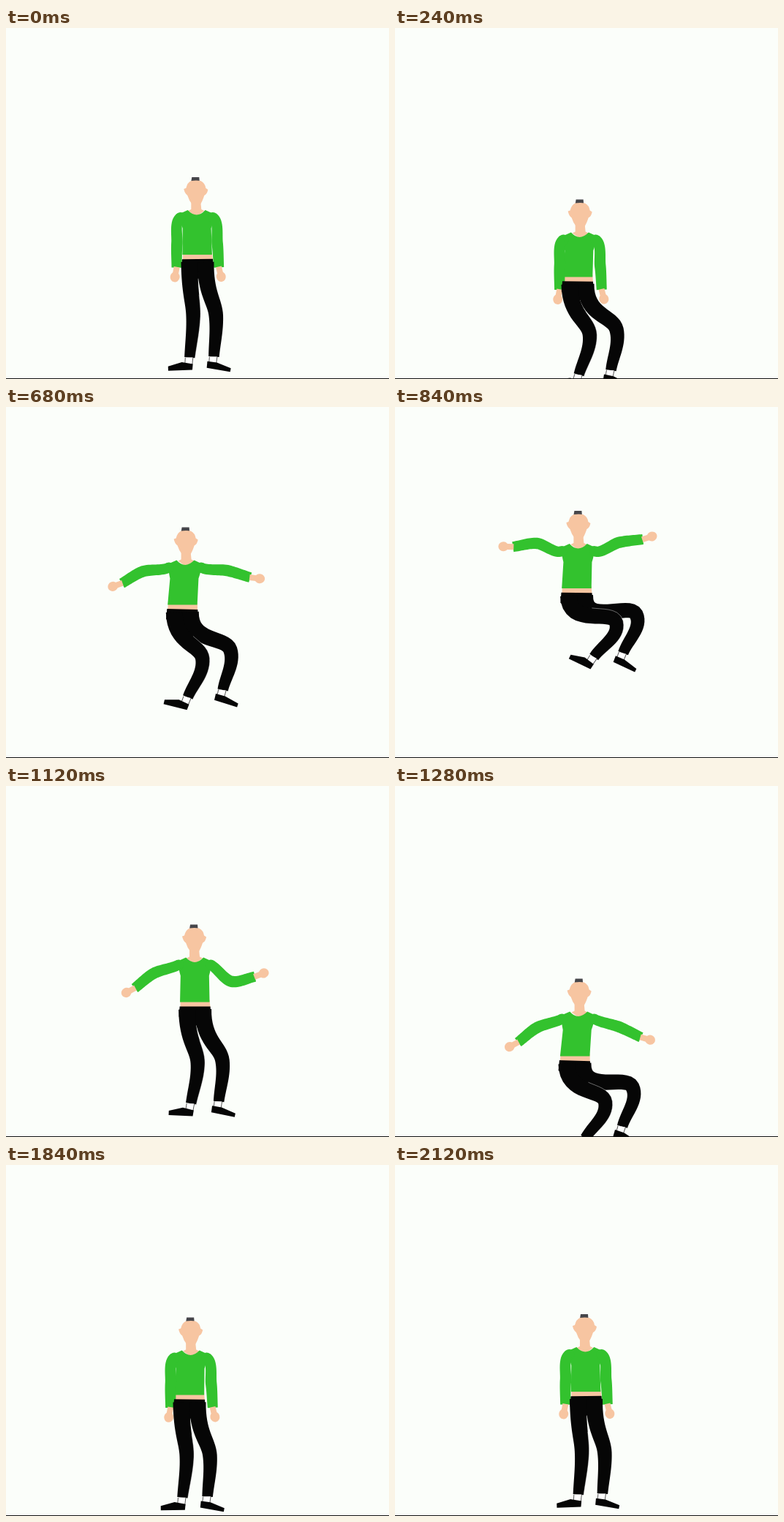
Write an HTML page with a canvas that moves like this. It is 524 px wide and 480 px high and loops after 2.22 s.

```html
<!DOCTYPE html>
<html lang="en">
<head>
<meta charset="utf-8">
<title>Jump</title>
<style>
html, body { margin: 0; width: 100%; height: 100%; overflow: hidden; background: #fbfefa; }
canvas { display: block; }
</style>
</head>
<body>
<canvas id="stage" width="524" height="480"></canvas>
<script>
const g = document.getElementById('stage').getContext('2d');
const BG = '#fbfefa', SHIRT = '#33c22e', SKIN = '#f7c5a1', BLACK = '#060606', HAIR = '#46464a';
const LOOP = 2220, TICKS = [0, 40, 80, 160, 200, 280, 320, 400, 440, 480];
// Key steps of the jump
const SQUAT = 8, PEAK = 15, LAND = 23, LAST = 38;

const rad = d => d * Math.PI / 180;
// Limb angles are degrees from straight down, positive to the right.
const dir = (deg, len) => [Math.sin(rad(deg)) * len, Math.cos(rad(deg)) * len];
const add = (a, b) => [a[0] + b[0], a[1] + b[1]];
const bump = (n, mid, width) => Math.exp(-(((n - mid) / width) ** 2));

function ramp(n, from, to) {
  const u = Math.min(1, Math.max(0, (n - from) / (to - from)));
  return u * u * (3 - 2 * u);
}

function waistY(n) {
  if (n <= SQUAT) return 316 + 61 * ramp(n, 0, SQUAT);
  if (n <= LAND) return 254 + (n < PEAK ? 2.5 : 1.9) * (n - PEAK) ** 2;
  return 376 - 60 * ramp(n, LAND, 35);
}

function poseAt(n) {
  const y = waistY(n);
  const x = 262 - 24 * ramp(n, 0, SQUAT) + 21 * ramp(n, 9, 21)
    - 15.5 * ramp(n, 20, 24) + 18 * ramp(n, 29, LAST);
  // Knees bend as the waist sinks, and once more for the tuck in the air.
  const sink = 0.87 * (Math.max(0, y - 316) / 60) ** 1.25;
  const bend = sink + 1.2 * bump(n, PEAK, 3.5);
  const raise = 8 + 99 * ramp(n, SQUAT, 14) - 36 * ramp(n, PEAK, 20) - 63 * ramp(n, LAND, 29);
  const lag = bump(n, 20, 1.6);
  return {
    x, y,
    lean: (262 - x) / 250 - 0.02 + 0.04 * sink,
    leftArm: [-raise, 6 - 0.82 * raise],
    rightArm: [raise + 2 - 22 * lag, 0.95 * raise - 4 + 38 * lag],
    leftLeg: [4 + 47 * bend, -5 - 28 * Math.min(1, bend)],
    rightLeg: [11 + 59 * Math.min(1, bend * 1.05), -3 - 13 * bend]
  };
}

function stepAt(t) {
  if (t < 80) return 0;
  if (t >= 2120) return LAST;
  const r = t - 80;
  return Math.floor(r / 560) * 10 + TICKS.filter(s => s <= r % 560).length;
}

function hermite(a, b, ta, tb, u) {
  const v = 1 - u;
  return (1 + 2 * u) * v * v * a + u * v * v * ta + u * u * (3 - 2 * u) * b - u * u * v * tb;
}

function poly(points, color) {
  g.beginPath();
  points.forEach(p => g.lineTo(p[0], p[1]));
  g.closePath();
  g.fillStyle = color;
  g.fill();
}

function oval(x, y, rx, ry, color) {
  g.beginPath();
  g.ellipse(x, y, rx, ry, 0, 0, 7);
  g.fillStyle = color;
  g.fill();
}

function at(p, angle, paint) {
  g.save();
  g.translate(p[0], p[1]);
  g.rotate(rad(angle));
  paint();
  g.restore();
}

// Tapered two-part tube; returns its end point and its right-hand edge.
function limb(start, [a1, a2], [l1, l2], widths, startPull, jointPull, color) {
  const joint = add(start, dir(a1, l1)), end = add(joint, dir(a2, l2));
  const pull = dir((a1 + a2) / 2, jointPull), endPull = dir(a2, l2);
  const N = 16, mid = [], right = [], left = [];
  for (let i = 0; i <= 2 * N; i++) {
    const low = i > N, u = i / N - low;
    const [p, q, tp, tq] = low ? [joint, end, pull, endPull] : [start, joint, startPull, pull];
    mid.push([0, 1].map(k => hermite(p[k], q[k], tp[k], tq[k], u)));
  }
  mid.forEach((p, i) => {
    const q = mid[Math.max(0, i - 1)], r = mid[Math.min(2 * N, i + 1)];
    const dx = r[0] - q[0], dy = r[1] - q[1], len = Math.hypot(dx, dy) || 1;
    const part = +(i > N), u = i / N - part;
    const w = (widths[part] + (widths[part + 1] - widths[part]) * u) / 2;
    right.push([p[0] + dy / len * w, p[1] - dx / len * w]);
    left.push([p[0] - dy / len * w, p[1] + dx / len * w]);
  });
  poly([...right, ...left.reverse()], color);
  return { end, right };
}

function arm(shoulder, angles, side) {
  oval(shoulder[0], shoulder[1], 7, 7, SHIRT);
  const { end } = limb(shoulder, angles, [36, 33], [14, 15.5, 14], dir(side * 62, 30), 30, SHIRT);
  at(end, -angles[1] - side * 10, () => {
    poly([[-4, -1], [4, -1], [4, 8], [-4, 8]], SKIN);
    oval(0, 13, 6.5, 7, SKIN);
  });
}

function leg(hip, angles, rest, shoe) {
  const { end, right } = limb(hip, angles, [75, 56], [23, 19.5, 14.5], [0, 130], 60, BLACK);
  at(end, rest - angles[1], () => {
    poly([[-6.5, 0], [5, 0], [3.5, 10], [-7.5, 10]], '#555');
    poly([[-5.5, 0], [4, 0], [2.5, 10], [-6.5, 10]], '#fff');
    poly(shoe, BLACK);
  });
  return right;
}

function head() {
  poly([[-6, -112], [4, -112], [4.5, -106], [-7, -106]], HAIR);
  poly([[-7, -78], [6, -78], [7, -68], [11, -66], [0, -58], [-11, -66], [-7, -68]], SKIN);
  g.beginPath();
  g.moveTo(-7, -107);
  g.quadraticCurveTo(0, -108, 6, -107);
  g.quadraticCurveTo(12, -104, 13, -97);
  g.lineTo(16, -95);
  g.quadraticCurveTo(15, -89, 11, -87);
  g.quadraticCurveTo(8, -78, 5, -74);
  g.lineTo(-5, -74);
  g.quadraticCurveTo(-10, -80, -12, -87);
  g.quadraticCurveTo(-16, -90, -17, -96);
  g.lineTo(-14, -97);
  g.quadraticCurveTo(-12, -105, -7, -107);
  g.fillStyle = SKIN;
  g.fill();
}

function torso() {
  poly([[-20, -9], [20, -9], [21, 2], [-20, 2]], SKIN);
  g.beginPath();
  g.moveTo(-12, -67);
  g.quadraticCurveTo(0, -54, 12, -67);
  g.lineTo(23, -62);
  g.quadraticCurveTo(22, -50, 19.5, -42);
  g.lineTo(20, -6);
  g.lineTo(-20.5, -6);
  g.lineTo(-19.5, -42);
  g.quadraticCurveTo(-22, -50, -23, -62);
  g.fillStyle = SHIRT;
  g.fill();
}

function draw(n) {
  const { x, y, lean, leftArm, rightArm, leftLeg, rightLeg } = poseAt(n);
  const body = (px, py) => [x + px - py * lean, y + py];
  g.fillStyle = BG;
  g.fillRect(0, 0, 524, 480);

  at([x + 85 * lean, y], 0, head);
  at([x, y], 0, () => {
    g.transform(1, 0, -lean, 1, 0, 0);
    torso();
  });
  arm(body(-22, -57), leftArm, -1);
  arm(body(22, -57), rightArm, 1);

  at([x, y], lean * 20, () =>
    poly([[-21, 0], [21, 0], [22, 14], [0, 27], [-22, 14]], BLACK));
  leg([x + 11, y + 4], rightLeg, -4, [[-9, 6], [4, 8], [23, 16], [22, 21], [-10, 15]]);
  const seam = leg([x - 11, y + 4], leftLeg, -7,
    [[-30, 11], [-11, 6], [4, 9], [3, 17], [-30, 17]]);

  g.beginPath();
  seam.slice(8).forEach(p => g.lineTo(p[0], p[1]));
  g.strokeStyle = 'rgba(255,255,255,.5)';
  g.lineWidth = 0.8;
  g.stroke();

  g.fillStyle = '#111';
  g.fillRect(0, 479, 524, 1);
}

function tick() {
  draw(stepAt(performance.now() % LOOP));
  requestAnimationFrame(tick);
}
tick();
</script>
</body>
</html>
```
